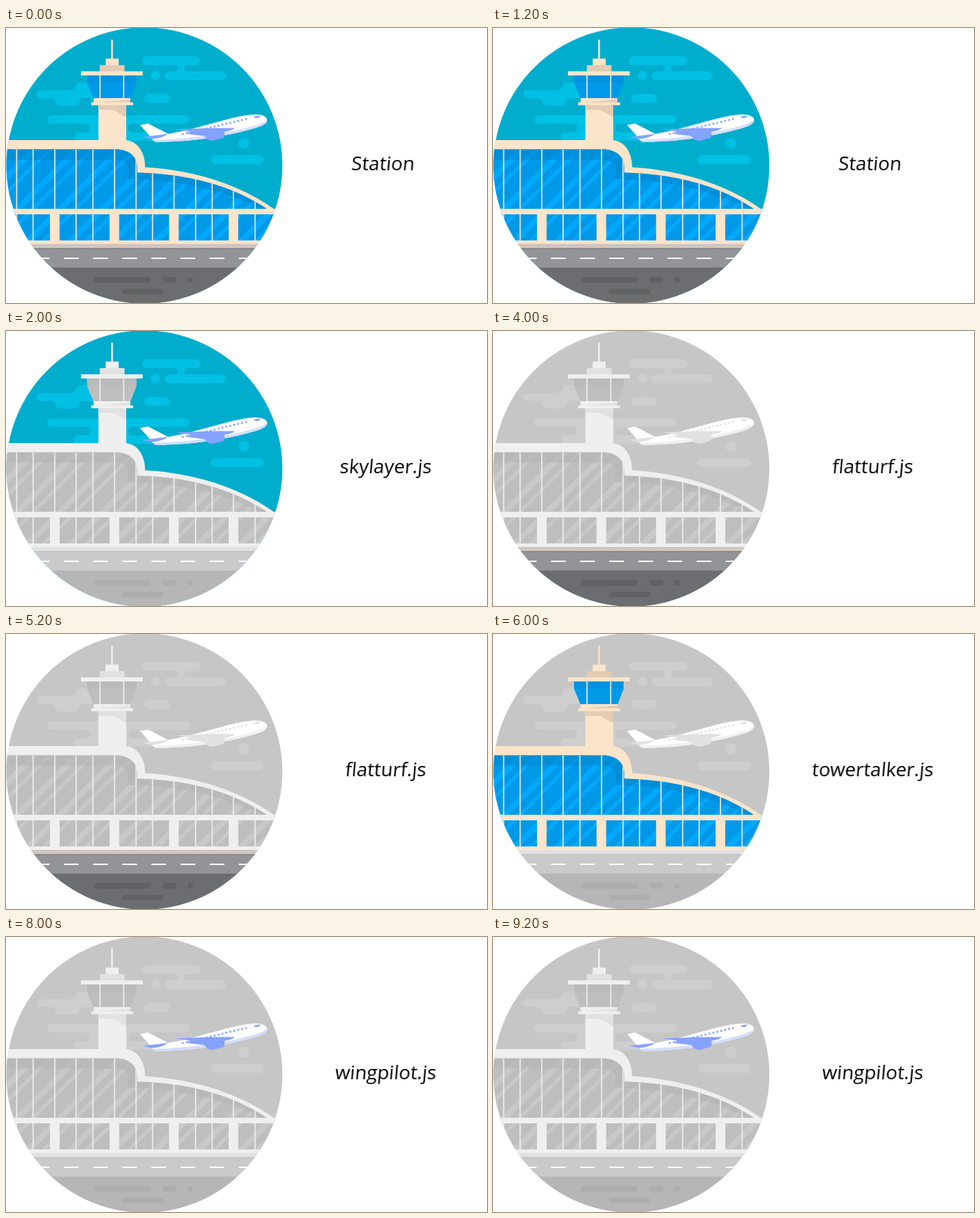
Write an HTML page without scripts that moves like this. It is 700 by 400 pixels and loops after 10000 ms.

```html
<!DOCTYPE html>
<html lang="en">
<head>
<meta charset="utf-8">
<title>Parts of a terminal</title>
<style>
  html, body { margin: 0; width: 100%; height: 100%; overflow: hidden; background: #fff; }
  svg { display: block; width: 700px; height: 400px; }

  /* Each layer has a coloured base palette; its keyframes swap in the grey one. */
  .sky, .plane, .hall, .ground { animation: 10s step-end infinite; }
  .sky    { --air: #00adcd; --cloud: #00c0e4; animation-name: sky; }
  .plane  { --belly: #d3ddff; --wing: #85a2ff; animation-name: plane; }
  .hall   { --wall: #fae4ca; --shade: #e3ccb3; --glass: #0099e8; --shine: #00a9ff;
            --dim: #0087cf; --bar: #f3ead8; animation-name: hall; }
  .ground { --kerb: #d1c6bc; --edge: #848589; --road: #939498; --soil: #6c6d71;
            --patch: #606165; animation-name: ground; }

  @keyframes sky {
    40%, 100% { --air: #c6c6c6; --cloud: #cecece; }
  }
  @keyframes plane {
    40% { --belly: #f0f0f0; --wing: #e1e1e1; }
    80% { --belly: #d3ddff; --wing: #85a2ff; }
  }
  @keyframes hall {
    20%, 80%, 100% { --wall: #efefef; --shade: #e1e1e1; --glass: #bebebe; --shine: #c8c8c8;
                     --dim: #b5b5b5; --bar: #efefef; }
    60% { --wall: #fae4ca; --shade: #e3ccb3; --glass: #0099e8; --shine: #00a9ff;
          --dim: #0087cf; --bar: #f3ead8; }
  }
  @keyframes ground {
    20%, 60%, 100% { --kerb: #e1e1e1; --edge: #c2c2c2; --road: #cacaca; --soil: #b6b6b6;
                     --patch: #adadad; }
    40% { --kerb: #d1c6bc; --edge: #848589; --road: #939498; --soil: #6c6d71;
          --patch: #606165; }
  }

  .air { fill: var(--air); }     .cloud { fill: var(--cloud); }
  .wall { fill: var(--wall); }   .shade { fill: var(--shade); }
  .glass { fill: var(--glass); } .dim { fill: var(--dim); }
  .belly { fill: var(--belly); } .wing { fill: var(--wing); }
  .kerb { fill: var(--kerb); }   .edge { fill: var(--edge); }
  .road { fill: var(--road); }   .soil { fill: var(--soil); }
  .patch { fill: var(--patch); }
  .bars { stroke: var(--bar); stroke-width: 1.7; fill: none; }
  .shine { stroke: var(--shine); stroke-width: 144; stroke-dasharray: 12 13 7 30; }
  .windows { stroke: var(--wing); stroke-width: 2.5; stroke-dasharray: 2.7 3.2; fill: none; }

  text { font: 400 28px "Open Sans", "Noto Sans", sans-serif; text-anchor: middle; opacity: 0;
         animation: show 10s step-end infinite; animation-delay: calc(var(--n) * 2s - 10s); }
  @keyframes show { 0% { opacity: 1; } 20%, 100% { opacity: 0; } }
</style>
</head>
<body>
<svg viewBox="0 0 700 400">
  <defs>
    <clipPath id="disc"><circle cx="201.400" cy="200" r="200.800"/></clipPath>
    <clipPath id="pane">
      <path d="M0 176.500H160C178 176.500 191 186 191 203V210.500C258 212 325 226 381 264H402V310H0Z"/>
    </clipPath>
  </defs>

  <g clip-path="url(#disc)">
    <g class="sky">
      <rect class="air" width="403" height="401"/>
      <g class="cloud">
        <rect x="198" y="41" width="85" height="13" rx="6.5"/>
        <rect x="231" y="63" width="89" height="13" rx="6.5"/>
        <path d="M246 54H263Q259 54 259 58.5T263 63H246Q250 63 250 58.5T246 54Z"/>
        <circle cx="217.5" cy="69" r="6.8"/>
        <rect x="201" y="96" width="37.500" height="13" rx="6.5"/>
        <path d="M50 90.500H94Q100 90 101 84.500Q103 79 109 79H140V102H111Q107 103 106.500 107Q105 113 99 113H80Q72 113 71.500 106Q70 102 66 102H50A5.750 5.750 0 0 1 50 90.500Z"/>
        <rect x="60" y="127" width="207" height="12" rx="6"/>
        <path d="M116 139H140V164H105A6 6 0 0 1 105 152H116A6.500 6.500 0 0 0 116 139Z"/>
        <path d="M170 139H184A6.500 6.500 0 0 0 184 152H229A6 6 0 0 1 229 164H170Z"/>
        <circle cx="346" cy="167.500" r="8"/>
        <rect x="298" y="185" width="77" height="13" rx="6.5"/>
      </g>
    </g>

    <g class="plane">
      <path fill="#fff" d="M195 141L207 139L236 154L262 149L325 132Q345 127 358 126C371 125 380 128 380 134C380 141 366 145 350 149C308 160 266 165 219 166Q214 165 211 159Z"/>
      <path class="belly" d="M380 134C380 141 366 145 350 149C308 160 266 165 219 166Q215 165 213 162.500C262 162 312 155 347 146Q372 140 380 134Z"/>
      <path class="wing" d="M198 158.500L236 154Q228 160 213 161.500Z"/>
      <path class="wing" d="M247 147.500L300 145.500L333 145.500Q330 149 318 151V157Q317 161 312 161L302 164Q293 164 291 160L289 157Q265 155 261 153L269 151Z"/>
      <path class="wing" d="M360 130.500Q362 127 371 127.500L367 131Z"/>
      <path class="windows" d="M256 154.500Q305 143 353 131.500"/>
    </g>

    <g class="hall">
      <rect class="wall" x="153" y="17" width="2.600" height="30"/>
      <rect class="wall" x="145" y="44.500" width="19" height="10"/>
      <rect class="shade" x="136.500" y="54" width="36" height="9.500"/>
      <path class="glass" d="M118 68H190V80L181 103H127.500L118 80Z"/>
      <path class="dim" opacity=".4" d="M118 68H190V79H118Z"/>
      <path class="bars" d="M136.800 69V102M171.300 69V102"/>
      <rect class="wall" x="109" y="63" width="90" height="6"/>
      <rect class="wall" x="127.500" y="102" width="53.500" height="7"/>
      <path class="shade" d="M131 108.500L181 104V108.500Z"/>
      <rect class="wall" x="134.500" y="112" width="40.500" height="54"/>
      <path class="shade" d="M134.500 112H175V130L158 120Q156 119 152 119H134.500Z"/>
      <rect class="wall" x="124" y="108.300" width="61" height="4"/>

      <path class="wall" d="M0 163H172C190 163 202.500 179 202.500 202.500C268 206 339 226 391 264H403V314.500H0Z"/>
      <g clip-path="url(#pane)">
        <rect class="glass" y="170" width="403" height="145"/>
        <path class="shine" d="M150 243H700" transform="skewX(-45)"/>
        <path class="dim" opacity=".6" d="M0 170H203V210C268 211 340 229 381 264H374C320 237 260 223 191 220H178V206Q178 192 160 191.500H0Z"/>
        <path class="bars" d="M15.500 176V310M39.500 176V310M71 176V264M102 176V310M126.500 176V310M158 176V264M189.300 176V310M213.300 205V310M244.500 205V264M276 205V310M300 205V310M331 205V264M362.500 205V310"/>
      </g>
      <g class="wall">
        <rect y="263" width="403" height="8"/>
        <rect x="64" y="270" width="14" height="41"/>
        <rect x="150.700" y="270" width="14" height="41"/>
        <rect x="237.300" y="270" width="14" height="41"/>
        <rect x="324" y="270" width="14" height="41"/>
        <rect y="309" width="403" height="5.500"/>
      </g>
    </g>

    <g class="ground">
      <rect class="kerb" y="314" width="403" height="6.500"/>
      <rect class="road" y="320" width="403" height="29"/>
      <rect class="edge" y="320" width="403" height="1.500"/>
      <path d="M42 335H370" stroke="#fff" stroke-width="2" stroke-dasharray="21.400 21"/>
      <rect class="soil" y="348.500" width="403" height="53"/>
      <g class="patch">
        <rect x="128" y="362" width="82.500" height="8.500" rx="4.200"/>
        <rect x="228" y="362" width="20" height="8.500" rx="4.200"/>
        <circle cx="268" cy="366" r="4.200"/>
        <rect x="169" y="379.500" width="60" height="7.500" rx="3.700"/>
      </g>
    </g>
  </g>

  <g transform="translate(552 207) skewX(-5)">
    <text x="-4" style="--n:0">Station</text>
    <text style="--n:1">skylayer.js</text>
    <text style="--n:2">flatturf.js</text>
    <text style="--n:3">towertalker.js</text>
    <text style="--n:4">wingpilot.js</text>
  </g>
</svg>
</body>
</html>
```
